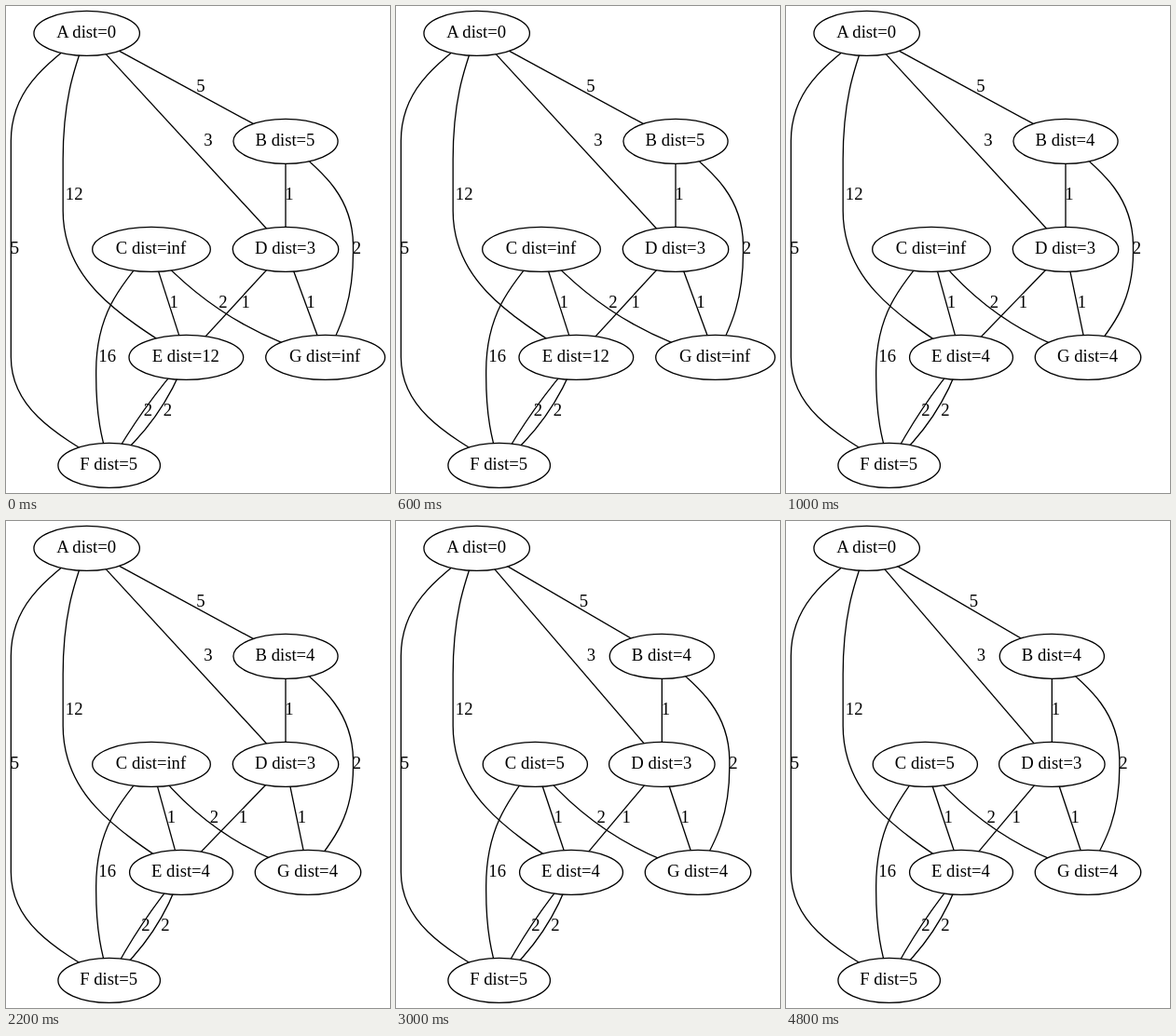
An HTML page that plays this animation: 412 px wide and 523 px high, repeating every 6000 ms.

```html
<!DOCTYPE html>
<html lang="en">
<head>
<meta charset="utf-8">
<title>Shortest distances</title>
<style>
html, body { margin: 0; width: 100%; height: 100%; overflow: hidden; background: #fff; }
svg { display: block; width: 412px; height: 523px; }
path, ellipse { fill: none; stroke: #000; stroke-width: 1.33; }
ellipse { fill: #fff; }
text { text-anchor: middle; }
</style>
</head>
<body>
<svg id="stage" viewBox="0 0 412 523"></svg>
<script>
const LOOP = 6000;
const FONT = '18.67px "Liberation Serif", "Times New Roman", serif';
const rank = { A: 0, B: 1, C: 2, D: 2, E: 3, F: 4, G: 3 };

// Each step lists only what changes.
const steps = [
  {
    at: 0,
    x: { A: 86.67, B: 300, C: 156, D: 300, E: 193.33, F: 110.67, G: 342.67 },
    dist: { A: 0, B: 5, C: 'inf', D: 3, E: 12, F: 5, G: 'inf' }
  },
  { at: 1000, x: { E: 188, G: 324 }, dist: { B: 4, E: 4, G: 4 } },
  { at: 3000, x: { B: 285.33, C: 149.33, D: 285.33 }, dist: { C: 5 } }
];

// gap: label offset from the middle; bend: sideways pull of the middle;
// bow: detour along a vertical at an offset from a node, between two heights.
const edges = [
  { ends: 'AB', weight: 5, gap: 15.5 },
  { ends: 'AD', weight: 3, gap: 23.5 },
  { ends: 'BD', weight: 1, gap: 4 },
  { ends: 'CE', weight: 1, gap: 5.5 },
  { ends: 'DE', weight: 1, gap: 10.5 },
  { ends: 'DG', weight: 1, gap: 5.5 },
  { ends: 'CG', weight: 2, gap: -16.5, bend: 33 },
  { ends: 'EF', weight: 2, gap: 0.5, bend: 8 },
  { ends: 'EF', weight: 2, gap: 21.5, bend: -19.5 },
  { ends: 'AF', weight: 5, bow: { by: 'A', dx: -81.33, top: 145, bottom: 377 } },
  { ends: 'AE', weight: 12, bow: { by: 'A', dx: -25.5, top: 165, bottom: 220 } },
  { ends: 'BG', weight: 2, bow: { by: 'B', dx: 72.5, top: 258, bottom: 264 } },
  { ends: 'CF', weight: 16, bow: { by: 'F', dx: -14, top: 392, bottom: 397 } }
];

const pen = document.createElement('canvas').getContext('2d');
pen.font = FONT;

const text = (s, x, y) => `<text x="${x}" y="${y + 4.67}">${s}</text>`;
const mix = (a, b, k) => a + (b - a) * k;

function makeNode(key, x, dist) {
  const name = `${key} dist=${dist}`;
  return { x, y: 29.33 + 116 * rank[key], name, rx: 15.5 + 0.635 * pen.measureText(name).width };
}

// Edges run between centres; the filled ellipses cover their ends.
function bent(a, b, bend = 0) {
  const dx = b.x - a.x, dy = b.y - a.y, k = bend / Math.hypot(dx, dy);
  return `M${a.x},${a.y} Q${(a.x + b.x) / 2 - dy * k},${(a.y + b.y) / 2 + dx * k} ${b.x},${b.y}`;
}

function bowed(a, b, x, top, bottom) {
  const near = (n, y) => `${mix(n.x, x, 0.6)},${mix(n.y, y, 0.31)}`;
  const pull = (n, y) => `${x},${mix(y, n.y, 0.45)}`;
  return `M${a.x},${a.y} C${near(a, top)} ${pull(a, top)} ${x},${top} ` +
    `V${bottom} C${pull(b, bottom)} ${near(b, bottom)} ${b.x},${b.y}`;
}

function drawEdge({ ends, weight, gap, bend, bow }, nodes) {
  const [a, b] = [...ends].map(k => nodes[k]);
  const y = (a.y + b.y) / 2;
  if (!bow) return [bent(a, b, bend), text(weight, (a.x + b.x) / 2 + gap, y)];
  const x = nodes[bow.by].x + bow.dx;
  const space = 8 * String(weight).length - 4;
  return [bowed(a, b, x, bow.top, bow.bottom), text(weight, x + space, y)];
}

function draw(x, dist) {
  const nodes = {};
  for (const k in rank) nodes[k] = makeNode(k, x[k], dist[k]);
  const drawn = edges.map(e => drawEdge(e, nodes));
  const lines = drawn.map(([d]) => `<path d="${d}"/>`);
  const ovals = Object.values(nodes).map(n =>
    `<ellipse cx="${n.x}" cy="${n.y}" rx="${n.rx}" ry="24"/>` + text(n.name, n.x - 0.5, n.y));
  return [...lines, ...ovals, ...drawn.map(([, label]) => label)].join('');
}

const stage = document.getElementById('stage');
stage.style.font = FONT;
const x = {}, dist = {};
stage.innerHTML = steps.map(step =>
  `<g>${draw(Object.assign(x, step.x), Object.assign(dist, step.dist))}</g>`).join('');
const groups = [...stage.children];

const start = performance.now();
function show() {
  const t = (performance.now() - start) % LOOP;
  const current = steps.filter(s => s.at <= t).length - 1;
  groups.forEach((g, i) => g.setAttribute('display', i === current ? 'inline' : 'none'));
  requestAnimationFrame(show);
}
show();
</script>
</body>
</html>
```
